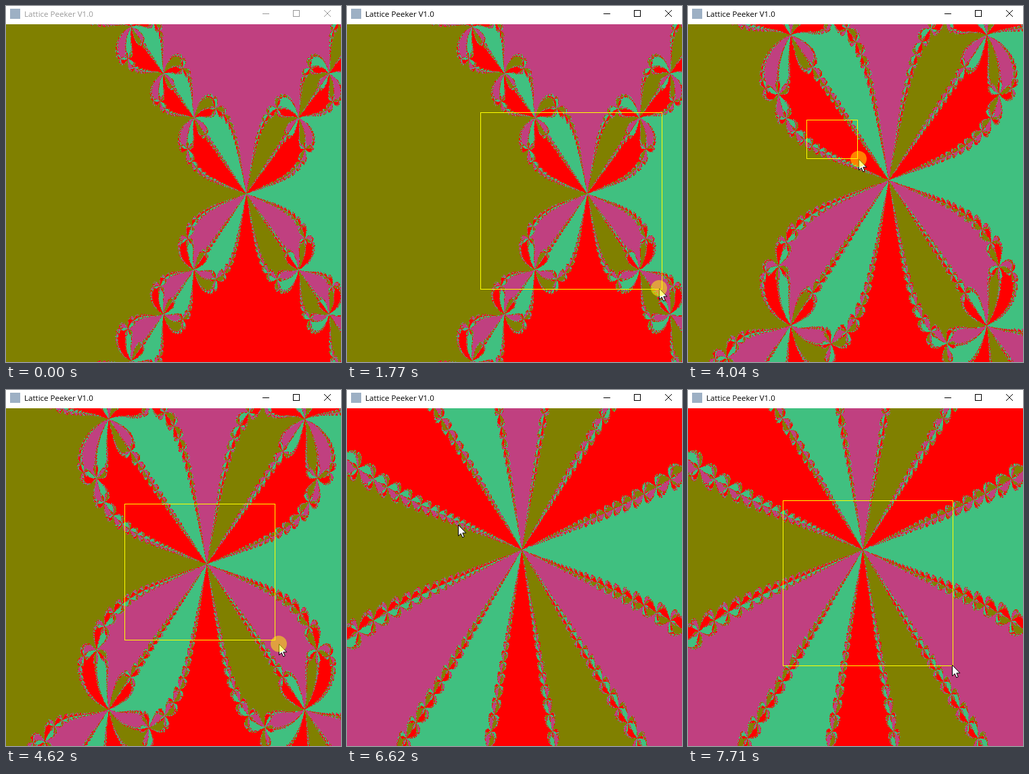
Recreate the animation shown at these times as an HTML page with a canvas. Size 495 by 526 pixels, loop 8000 ms.

```html
<!DOCTYPE html>
<html lang="en">
<head>
<meta charset="utf-8">
<title>Lattice Peeker</title>
<style>
  html, body { margin: 0; width: 100%; height: 100%; overflow: hidden; background: #fff; }
  canvas { position: absolute; left: 0; top: 27px; }
  svg { position: absolute; left: 0; top: 0; }
  text { font: 11.6px "Open Sans", "Noto Sans", sans-serif; }
</style>
</head>
<body>
<canvas id="plot" width="495" height="499"></canvas>
<svg width="495" height="526" viewBox="0 0 495 526">
  <rect width="495" height="27" fill="#fff"/>
  <rect x="6" y="4" width="15" height="15" fill="#9db0c4"/>
  <g id="chrome">
    <text x="27" y="16">Lattice Peeker V1.0</text>
    <g fill="none" stroke="currentColor">
      <path d="M379 11.5h10M424.5 6.5h9v9h-9z" shape-rendering="crispEdges"/>
      <path d="M470 6l10 10M480 6l-10 10"/>
    </g>
  </g>
  <rect id="box" fill="none" stroke="#ff0" shape-rendering="crispEdges"/>
  <path id="arrow" d="M.5 .5V16.6L4.2 13.2L6.7 18.9L9.2 17.8L6.8 12.2H11.8Z" fill="#fff" stroke="#000"/>
  <circle id="press" r="12" fill="#ff0" fill-opacity=".5"/>
</svg>
<script>
const LOOP = 8000, STEP = 65;
const PANEL = { top: 27, w: 498, h: 500 };
const $ = id => document.getElementById(id);
const canvas = $('plot'), ctx = canvas.getContext('2d');
const chrome = $('chrome'), box = $('box'), arrow = $('arrow'), press = $('press');

// Basin colours of the roots 1, i, -1, -i
const COLORS = [[64, 192, 128], [192, 64, 128], [128, 128, 0], [255, 0, 0]];

// Pointer moves: begin, end, and where each one arrives
const ENTRY = { x: 358, y: 490 };
const MOVES = [
  { a: 110, b: 750, x: 197, y: 157 },
  { a: 930, b: 1260, x: 448, y: 402 },
  { a: 1510, b: 1575, x: 484, y: 418 },
  { a: 1575, b: 1770, x: 461, y: 417 },
  { a: 2690, b: 2820, x: 345, y: 420 },
  { a: 3370, b: 3650, x: 175, y: 168 },
  { a: 3715, b: 4040, x: 252, y: 226 },
  { a: 4040, b: 4670, x: 408, y: 380 },
  { a: 5280, b: 5345, x: 401, y: 396 },
  { a: 5530, b: 5740, x: 320, y: 433 },
  { a: 6290, b: 6800, x: 140, y: 163 },
  { a: 6900, b: 7640, x: 390, y: 406 }
];

// Each drag selects a region; the panel zooms into it later
const DRAGS = [
  { down: 930, up: 2270, zoom: 2690 },
  { down: 3680, up: 4740, zoom: 5860 },
  { down: 6830, up: 7710, zoom: LOOP }
];

const easeOut = u => 1 - (1 - u) ** 2;

// Moves advance in whole screen refreshes
function pointer(t) {
  let { x, y } = ENTRY;
  for (const m of MOVES) {
    if (t < m.a) break;
    const steps = Math.floor((t - m.a) / STEP + 1e-6);
    const u = t >= m.b ? 1 : easeOut(steps * STEP / (m.b - m.a));
    x += (m.x - x) * u;
    y += (m.y - y) * u;
  }
  return { x: Math.round(x), y: Math.round(y) };
}

function selection(drag, t) {
  const p = pointer(drag.down), q = pointer(Math.min(t, drag.up));
  return { x: p.x, y: p.y, w: q.x - p.x + 1, h: q.y - p.y + 1 };
}

// A view holds the origin on the stage and the pixels per unit
function zoomIn(view, s) {
  const kx = PANEL.w / s.w, ky = PANEL.h / s.h;
  return {
    cx: (view.cx - s.x) * kx,
    cy: (view.cy - s.y) * ky + PANEL.top,
    sx: view.sx * kx,
    sy: view.sy * ky
  };
}

// Newton's method for z^4 = 1
function basin(x, y) {
  for (let i = 0; i < 60; i++) {
    const xx = x * x, yy = y * y, m = xx + yy;
    if (m < 1e-18) break;
    const m3 = 4 * m ** 3;
    const nx = 0.75 * x + x * (xx - 3 * yy) / m3;
    const ny = 0.75 * y - y * (3 * xx - yy) / m3;
    const moved = Math.abs(nx - x) + Math.abs(ny - y);
    x = nx;
    y = ny;
    if (moved < 0.01) break;
  }
  return Math.abs(x) > Math.abs(y) ? (x > 0 ? 0 : 2) : (y > 0 ? 1 : 3);
}

function render(view) {
  const { width, height } = canvas, img = ctx.createImageData(width, height);
  for (let j = 0, p = 0; j < height; j++) {
    for (let i = 0; i < width; i++, p += 4) {
      const x = (i - view.cx) / view.sx, y = (view.cy - j - PANEL.top) / view.sy;
      img.data.set([...COLORS[basin(x, y)], 255], p);
    }
  }
  return img;
}

const views = [{ cx: 354.6, cy: 277, sx: 143.3, sy: 208.4 }];
for (const d of DRAGS.slice(0, -1)) views.push(zoomIn(views[views.length - 1], selection(d, d.up)));
const images = views.map(render);
let shown = -1;

const show = (el, on) => el.setAttribute('visibility', on ? 'visible' : 'hidden');

function set(el, attrs) {
  for (const k in attrs) el.setAttribute(k, attrs[k]);
}

function draw(t) {
  const view = DRAGS.filter(d => t >= d.zoom).length;
  if (view !== shown) ctx.putImageData(images[shown = view], 0, 0);

  const ink = t < DRAGS[0].down ? '#999' : '#000';
  set(chrome, { fill: ink, color: ink });

  const { x, y } = pointer(t);
  set(arrow, { transform: `translate(${x} ${y})` });
  set(press, { cx: x, cy: y });
  show(arrow, t >= MOVES[0].a);

  const drag = DRAGS[view];
  show(press, t >= drag.down && t < drag.up);

  // The selection trails the pointer by one refresh
  const s = selection(drag, t - STEP);
  const open = t > drag.down + STEP && s.w > 1 && s.h > 1;
  show(box, open);
  if (open) set(box, { x: s.x + 0.5, y: s.y + 0.5, width: s.w, height: s.h });
}

const start = performance.now();
function tick() {
  draw((performance.now() - start) % LOOP);
  requestAnimationFrame(tick);
}
tick();
</script>
</body>
</html>
```
